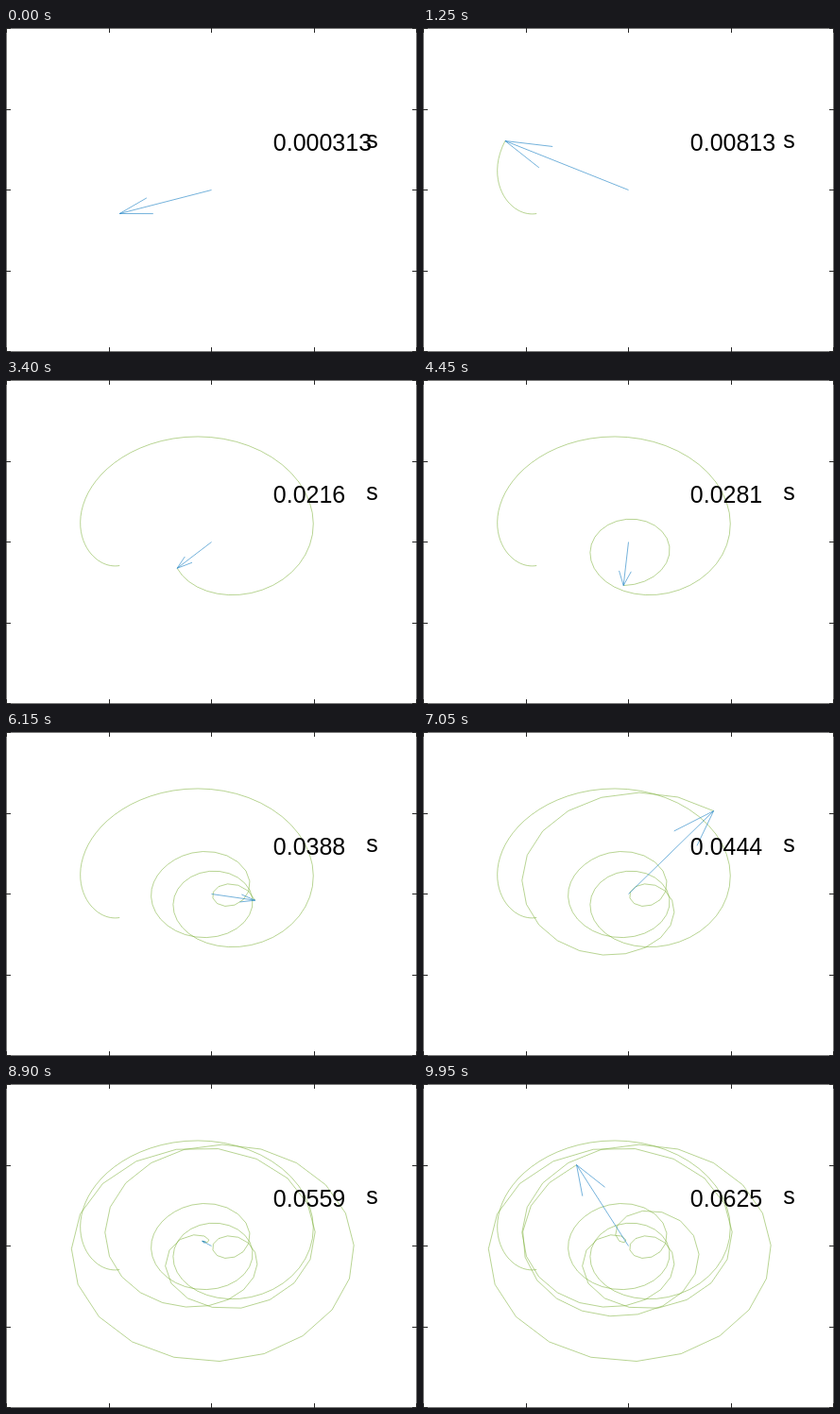
These frames come from a looping animation (435x343 px, 10000 ms). An HTML page:

```html
<!DOCTYPE html>
<html lang="en">
<head>
<meta charset="utf-8">
<title>Rotating vector</title>
<style>
  html, body { margin: 0; width: 100%; height: 100%; overflow: hidden; background: #fff; }
  svg { display: block; width: 435px; height: 343px; }
  path { fill: none; stroke-linejoin: round; }
  #box { stroke: #777; }
  #ticks { stroke: #262626; }
  #trail { stroke: #77ac30; stroke-width: .52; }
  #arrow { stroke: #0072bd; stroke-width: .55; }
  text { font: 25px "Liberation Sans", Arial, sans-serif; fill: #000; }
</style>
</head>
<body>
<svg viewBox="0 0 435 343">
  <path id="box" d="M.5 .5H434.5V342.5H.5Z"/>
  <path id="ticks"/>
  <path id="trail"/>
  <path id="arrow"/>
  <text id="time" x="282.8" y="130"></text>
  <text x="381.2" y="127">s</text>
</svg>
<script>
const STEPS = 200, STEP_MS = 50, RATE = 3200;
const OX = 217.5, OY = 171.5, UX = 108.5, UY = 85.5;
const HEAD = 0.33;
const $ = id => document.getElementById(id);

// The vector turns clockwise: a linear chirp that levels off (degrees per step).
const ACCEL = 0.13, TOP = 18;
const RAMP = TOP / ACCEL, RAMP_PHASE = TOP * RAMP / 2;
const phaseAt = k => k < RAMP ? ACCEL * k * k / 2 : RAMP_PHASE + TOP * (k - RAMP);
const stepAt = p => p < RAMP_PHASE ? Math.sqrt(2 * p / ACCEL) : RAMP + (p - RAMP_PHASE) / TOP;

function rotate([u, v], degrees) {
  const a = degrees * Math.PI / 180, c = Math.cos(a), s = Math.sin(a);
  return [u * c - v * s, u * s + v * c];
}

// Where the tip is after every 108 degrees of chirp phase.
const KEY_PHASE = 108;
const keys = [
  [122.5, 196], [227, 61.8], [296.5, 208.5], [177, 186], [256, 164], [199, 216.7],
  [156, 160], [219, 127], [239, 184], [249, 163.5], [216.5, 234.3], [105, 152],
  [279, 71.5], [339, 246], [92, 239], [190.5, 68], [319, 192], [172.5, 207],
  [215, 166], [237, 134], [270.5, 224], [117, 202.5], [207, 73]
];

// Natural cubic spline through (t, v).
function spline(t, v) {
  const n = t.length, m = Array(n).fill(0), c = Array(n).fill(0);
  for (let i = 1; i < n - 1; i++) {
    const a = t[i] - t[i - 1], b = t[i + 1] - t[i];
    const d = 2 * (a + b) - a * c[i - 1];
    const rhs = 6 * ((v[i + 1] - v[i]) / b - (v[i] - v[i - 1]) / a);
    c[i] = b / d;
    m[i] = (rhs - a * m[i - 1]) / d;
  }
  for (let i = n - 2; i > 0; i--) m[i] -= c[i] * m[i + 1];
  return s => {
    let i = 0;
    while (i < n - 2 && s > t[i + 1]) i++;
    const h = t[i + 1] - t[i], p = (t[i + 1] - s) / h, q = 1 - p;
    return p * v[i] + q * v[i + 1] +
      ((p ** 3 - p) * m[i] + (q ** 3 - q) * m[i + 1]) * h * h / 6;
  };
}

// Seen from the rotating frame the vector drifts slowly, so few keys suffice.
const keySteps = keys.map((_, i) => stepAt(i * KEY_PHASE));
const slow = keys.map(([x, y], i) => rotate([(x - OX) / UX, (OY - y) / UY], i * KEY_PHASE));
const slowU = spline(keySteps, slow.map(e => e[0]));
const slowV = spline(keySteps, slow.map(e => e[1]));

const vectors = Array.from({ length: STEPS }, (_, i) =>
  rotate([slowU(i + 1), slowV(i + 1)], -phaseAt(i + 1)));

const toStage = ([u, v]) => [OX + UX * u, OY - UY * v];
const line = pts => "M" + pts.map(p => toStage(p).map(n => n.toFixed(2)).join(" ")).join("L");

function arrow(tip) {
  const [u, v] = tip;
  const barb = side => [
    u - HEAD * (u + side * HEAD * v),
    v - HEAD * (v - side * HEAD * u)
  ];
  return line([[0, 0], tip]) + line([barb(1), tip, barb(-1)]);
}

let ticks = "";
for (const x of [0.5, 109.5, 217.5, 326.5, 434.5]) ticks += `M${x} 0v5M${x} 343v-5`;
for (const y of [0.5, 86.5, 171.5, 257.5, 342.5]) ticks += `M0 ${y}h5M435 ${y}h-5`;
$("ticks").setAttribute("d", ticks);

function draw(step) {
  $("trail").setAttribute("d", step > 1 ? line(vectors.slice(0, step)) : "");
  $("arrow").setAttribute("d", arrow(vectors[step - 1]));
  $("time").textContent = String(+(step / RATE + 1e-9).toPrecision(3));
}

const start = performance.now();
let shown = 0;
function tick() {
  const ms = Math.max(0, performance.now() - start) % (STEPS * STEP_MS);
  const step = Math.floor(ms / STEP_MS) + 1;
  if (step !== shown) draw(shown = step);
  requestAnimationFrame(tick);
}
tick();
</script>
</body>
</html>
```
